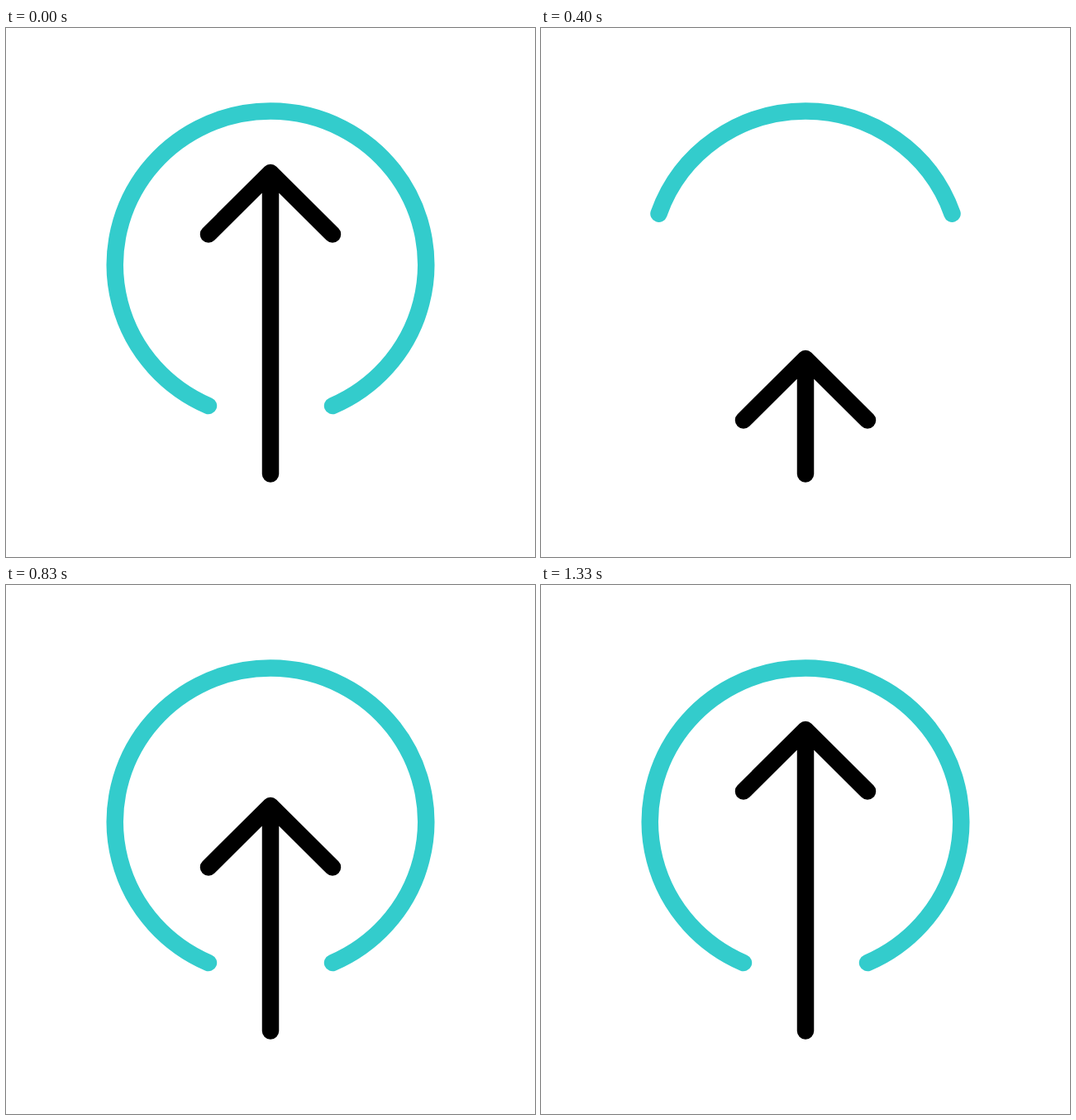
Animation, 640 px wide and 640 px high, one loop 2 s. Source, as an HTML page:

```html
<!DOCTYPE html>
<html lang="en">
<head>
<meta charset="utf-8">
<style>
  html, body { margin: 0; height: 100%; overflow: hidden; background: #fff; }
  svg { display: block; width: 100%; height: 100%; }
  path { fill: none; stroke: #000; stroke-width: 20.5; stroke-linecap: round; stroke-linejoin: round; }
  #ring { stroke: #3cc; }
</style>
</head>
<body>
<svg viewBox="0 0 640 640">
  <path id="ring"/>
  <path id="arrow"/>
</svg>
<script>
const LOOP = 2000;
const ring = document.getElementById('ring');
const arrow = document.getElementById('arrow');

// Keys are [tick, value], with 30 ticks per second.
const DROP = [[0.95, 0], [15.1, 288], [21.35, 0], [25.4, 102], [31, 0], [35, 84], [40, 0]];
const TRIM = [[0.95, 0], [15.1, 110], [22, 0]];

function valueAt(keys, tick) {
  const next = keys.findIndex(([time]) => time > tick);
  if (next < 1) return 0;
  const [t0, v0] = keys[next - 1];
  const [t1, v1] = keys[next];
  return v0 + (v1 - v0) * (tick - t0) / (t1 - t0);
}

function draw(tick) {
  const half = 156.5 - valueAt(TRIM, tick);
  const angle = half * Math.PI / 180;
  const dx = 188.2 * Math.sin(angle);
  const y = 286.5 - 186 * Math.cos(angle);
  ring.setAttribute('d', `M${320 - dx} ${y}A188.2 186 0 ${half > 90 ? 1 : 0} 1 ${320 + dx} ${y}`);

  const tip = 175 + valueAt(DROP, tick);
  arrow.setAttribute('d', `M245 ${tip + 74.5}L320 ${tip}L395 ${tip + 74.5}M320 ${tip}V539.5`);
}

function frame() {
  const time = performance.now() % LOOP;
  draw(Math.floor(time * 0.03 + 0.15));
  requestAnimationFrame(frame);
}
frame();
</script>
</body>
</html>
```
